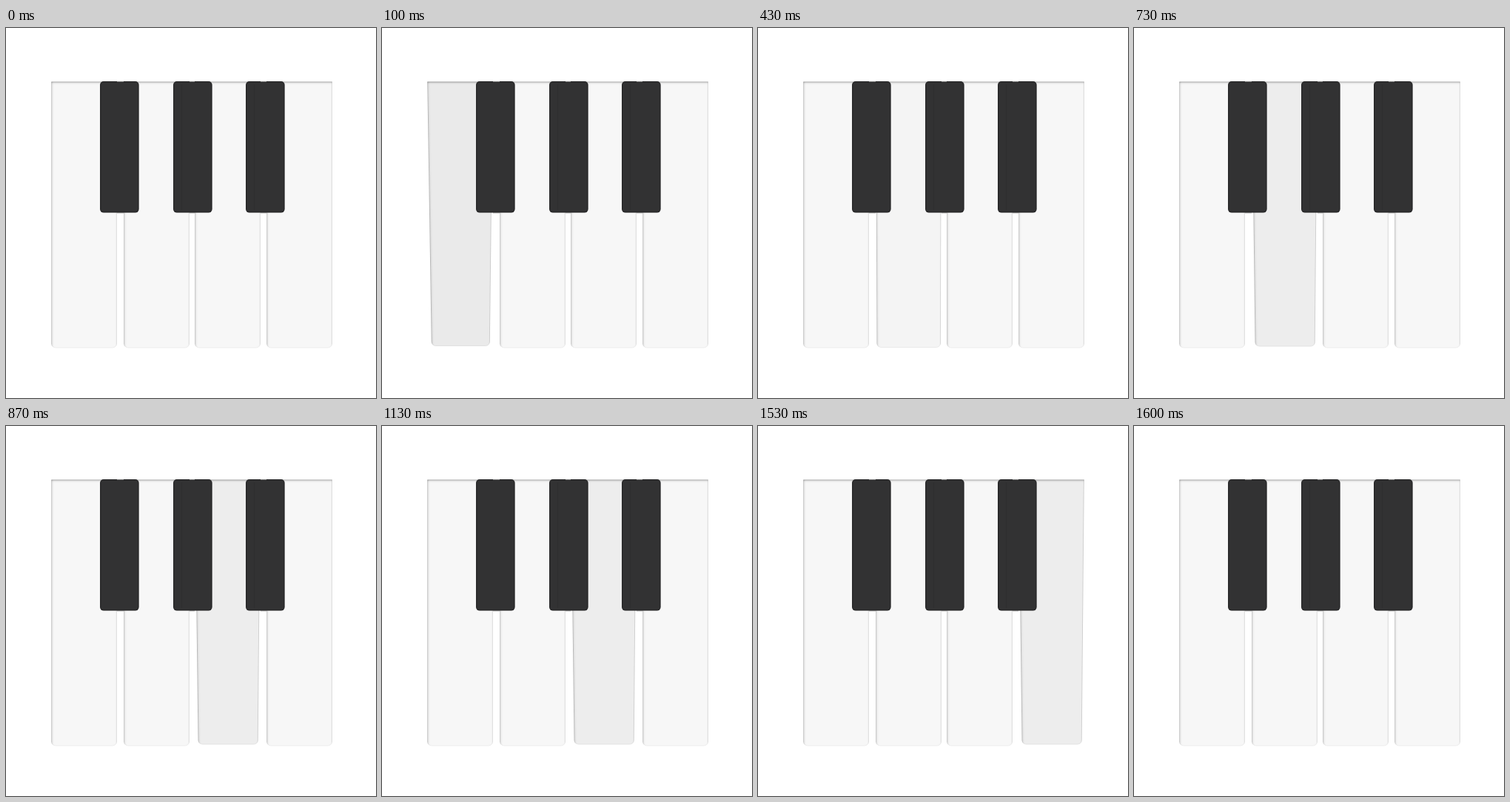
Recreate the animation shown at these times as an HTML page with a canvas. Size 500 px wide and 500 px high, loop 2.18 s.

```html
<!DOCTYPE html>
<html lang="en">
<head>
<meta charset="utf-8">
<title>Piano keys</title>
<style>
html, body { margin: 0; width: 100%; height: 100%; overflow: hidden; background: #fff; }
canvas { display: block; width: 500px; height: 500px; }
</style>
</head>
<body>
<canvas id="stage" width="500" height="500"></canvas>
<script>
const ctx = document.getElementById('stage').getContext('2d');
const LOOP = 2180;
const TOP = 72.5, BOTTOM = 432.5, WIDTH = 88.6;
const WHITE = [61.2, 159.2, 255.2, 352.2];
const BLACK = [127, 226, 324];
const GAPS = [[150, 159], [248, 255], [344, 352]];
// time since the key starts to move, depth reached
const STEPS = [[0, 0.22], [40, 0.78], [70, 1]];

function progress(t) {
  let p = 0;
  for (const [at, value] of STEPS) if (t >= at) p = value;
  return p;
}

function depth(i, t) {
  const start = 30 + 400 * i, release = start + 300;
  if (t < release) return progress(t - start);
  const dt = t - release;
  return dt < 40 ? 0.78 : dt < 70 ? 0.22 : 0;
}

function corners(x, p) {
  return { l: x, r: x + WIDTH, bl: x + 5.6 * p, br: x + WIDTH - 4 * p, b: BOTTOM - 2.5 * p };
}

function keyPath(k, radius) {
  ctx.beginPath();
  ctx.moveTo(k.l, TOP);
  ctx.lineTo(k.r, TOP);
  ctx.arcTo(k.br, k.b, k.bl, k.b, radius);
  ctx.arcTo(k.bl, k.b, k.l, TOP, radius);
  ctx.closePath();
}

function line(x1, y1, x2, y2, width, alpha) {
  ctx.beginPath();
  ctx.moveTo(x1, y1);
  ctx.lineTo(x2, y2);
  ctx.lineWidth = width;
  ctx.strokeStyle = `rgba(0,0,0,${alpha})`;
  ctx.stroke();
}

function drawWhite(x, p) {
  const k = corners(x, p), tone = Math.round(247 - 13 * p);
  ctx.save();
  keyPath(k, 6);
  ctx.fillStyle = `rgb(${tone},${tone},${tone})`;
  ctx.fill();
  ctx.clip();
  // soft inner shade, strongest along the top
  for (const [w, a] of [[2, 0.2], [4, 0.07], [7, 0.03]]) {
    line(k.l, TOP, k.r, TOP, w, a);
    line(k.l, TOP, k.bl, k.b, w, a * 0.6);
  }
  line(k.r, TOP, k.br, k.b, 2, 0.09);
  keyPath(k, 6);
  ctx.lineWidth = 2;
  ctx.strokeStyle = 'rgba(0,0,0,0.04)';
  ctx.stroke();
  ctx.restore();
}

function drawBlack(x, i) {
  ctx.beginPath();
  ctx.roundRect(x, 72, 52.6, 177.6, 5);
  ctx.fillStyle = '#323233';
  ctx.fill();
  ctx.save();
  ctx.clip();
  ctx.lineWidth = 3;
  ctx.strokeStyle = 'rgba(0,0,0,0.2)';
  ctx.stroke();
  if (i) line(x + 11.5, 76, x + 11.5, 246, 1, 0.08);
  ctx.restore();
  const [a, b] = GAPS[i];
  ctx.fillStyle = '#e4e4e4';
  ctx.fillRect(a, 71.5, b - a, 1);
  ctx.fillStyle = 'rgba(40,40,40,0.5)';
  ctx.fillRect(a, 249.5, b - a, 0.8);
}

const origin = performance.now();

function draw() {
  const t = Math.max(0, performance.now() - origin) % LOOP;
  ctx.fillStyle = '#fff';
  ctx.fillRect(0, 0, 500, 500);
  WHITE.forEach((x, i) => drawWhite(x, depth(i, t)));
  BLACK.forEach(drawBlack);
  requestAnimationFrame(draw);
}
draw();
</script>
</body>
</html>
```
